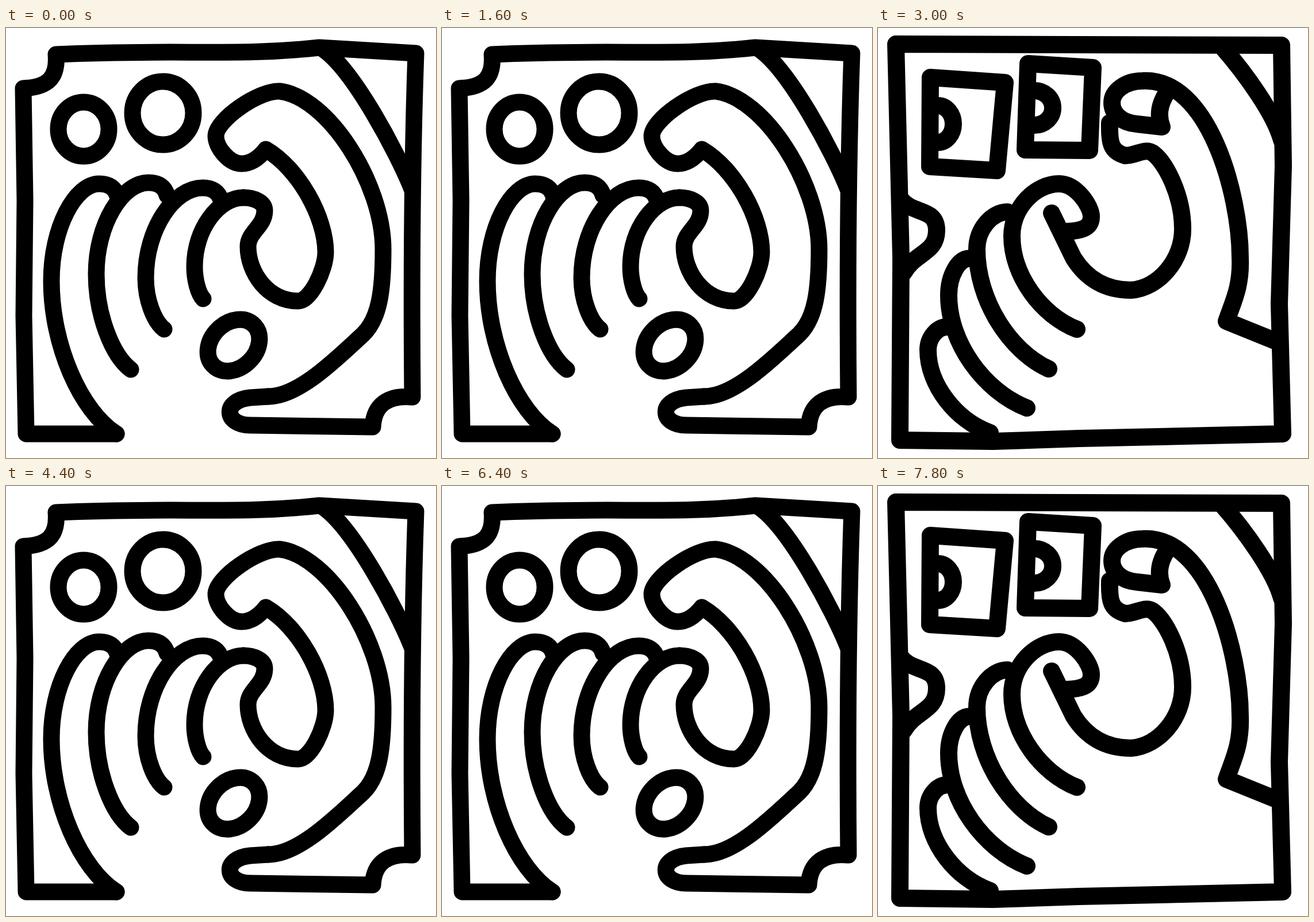
An HTML page for the animation above (8000 ms loop, 748 by 748 pixels).

```html
<!DOCTYPE html>
<html lang="en">
<head>
<meta charset="utf-8">
<title>Hand and receiver</title>
<style>
  html, body { margin: 0; width: 100%; height: 100%; overflow: hidden; background: #fff; }
  svg { display: block; width: 100%; height: 100%; }
  g { fill: none; stroke: #000; stroke-linecap: round; stroke-linejoin: round; }
</style>
</head>
<body>
<svg id="stage" viewBox="0 0 748 748"></svg>
<script>
const STEP = 200;
const stage = document.getElementById('stage');

function make(tag, parent, attrs) {
  const node = document.createElementNS('http://www.w3.org/2000/svg', tag);
  for (const key in attrs) node.setAttribute(key, attrs[key]);
  return parent.appendChild(node);
}

// A finger rises from its base, stands upright at its side and rounds off at the tip.
function finger([bx, by], [sx, sy], [tx, ty]) {
  const dx = bx - sx, dy = by - sy;
  return `M${bx},${by}`
    + `C${sx + 0.45 * dx},${sy + 0.85 * dy} ${sx},${sy + 0.42 * dy} ${sx},${sy}`
    + `C${sx},${sy - 0.55 * (sy - ty)} ${tx - 0.5 * (tx - sx)},${ty} ${tx},${ty}`;
}

function pose(width) {
  const group = make('g', stage, { 'stroke-width': width });
  return {
    group,
    line: d => make('path', group, { d }),
    ring: (cx, cy, rx, ry, turn = 0) =>
      make('ellipse', group, { cx, cy, rx, ry, transform: `rotate(${turn} ${cx} ${cy})` })
  };
}

function drawListening() {
  const { group, line, ring } = pose(29);
  const hook = 'q26,0 32,22';

  // Border with two notched corners
  line('M192,706 H35 L31,500 33,300 30,105 C75,103 90,85 87,46 C300,36 400,50 545,34 L713,44'
    + 'Q704,300 707,642 C665,638 640,655 638,694 L425,691'
    + 'C380,691 375,648 425,643 L456,641');
  line('M553,38 C605,75 680,215 706,280');

  // Arm and receiver
  line('M456,641 C510,641 575,575 621,533 C650,505 656,455 656,385 C656,270 560,120 476,110'
    + 'C440,108 365,160 365,188 C365,208 388,236 410,236 Q432,236 452,211'
    + 'C510,245 556,330 556,390 C556,420 530,475 508,475 C455,475 421,425 421,380'
    + 'C421,355 450,345 450,318 C450,302 430,295 413,295');

  line(finger([192, 706], [79, 440], [162, 271]) + hook);
  line(finger([217, 594], [157, 428], [248, 269]) + hook);
  line(finger([275, 524], [243, 435], [342, 278]) + hook);
  line(finger([343, 471], [328, 415], [413, 295]));

  ring(135, 176, 44, 47);
  ring(273, 148, 53, 55);
  ring(396, 552, 50, 39, -45);
  return group;
}

function drawReaching() {
  const { group, line } = pose(30);

  // Border
  line('M31,28 L702,30 705,240 698,480 704,706 350,714 200,719 38,717 40,400Z');
  line('M598,32 C640,80 690,150 702,195');
  line('M40,298 C60,325 102,312 102,352 S65,390 45,425');

  // Arm and receiver
  line('M690,544 L606,510 C618,475 632,450 630,400 C630,290 575,85 460,92'
    + 'C430,92 407,110 407,130 C407,150 425,165 450,167 L494,172 Q482,142 504,110');
  line('M302,322 L340,400 C365,440 400,456 440,456 C490,452 530,402 530,350'
    + 'C530,290 500,235 480,219 C465,207 450,222 430,222 C405,215 402,200 403,165');

  line(finger([195, 704], [87, 560], [120, 520]));
  line(finger([259, 661], [123, 465], [158, 401]));
  line(finger([297, 593], [172, 385], [225, 320]));
  line(finger([346, 524], [233, 362], [315, 271])
    + 'C345,271 371,310 371,328 C371,350 350,353 328,354');

  // Keys
  line('M91,86 L221,95 207,248 90,241Z M104,135 a27,32 0 0 1 0,64');
  line('M261,62 L374,69 368,213 256,212Z M272,109 a32,30 0 0 1 0,60');
  return group;
}

const poses = [drawListening(), drawReaching()];

function render(time) {
  const current = Math.floor(time / STEP) % poses.length;
  poses.forEach((group, i) => group.setAttribute('display', i === current ? 'inline' : 'none'));
}

const start = performance.now();
function tick() {
  render(performance.now() - start);
  requestAnimationFrame(tick);
}
render(0);
requestAnimationFrame(tick);
</script>
</body>
</html>
```
